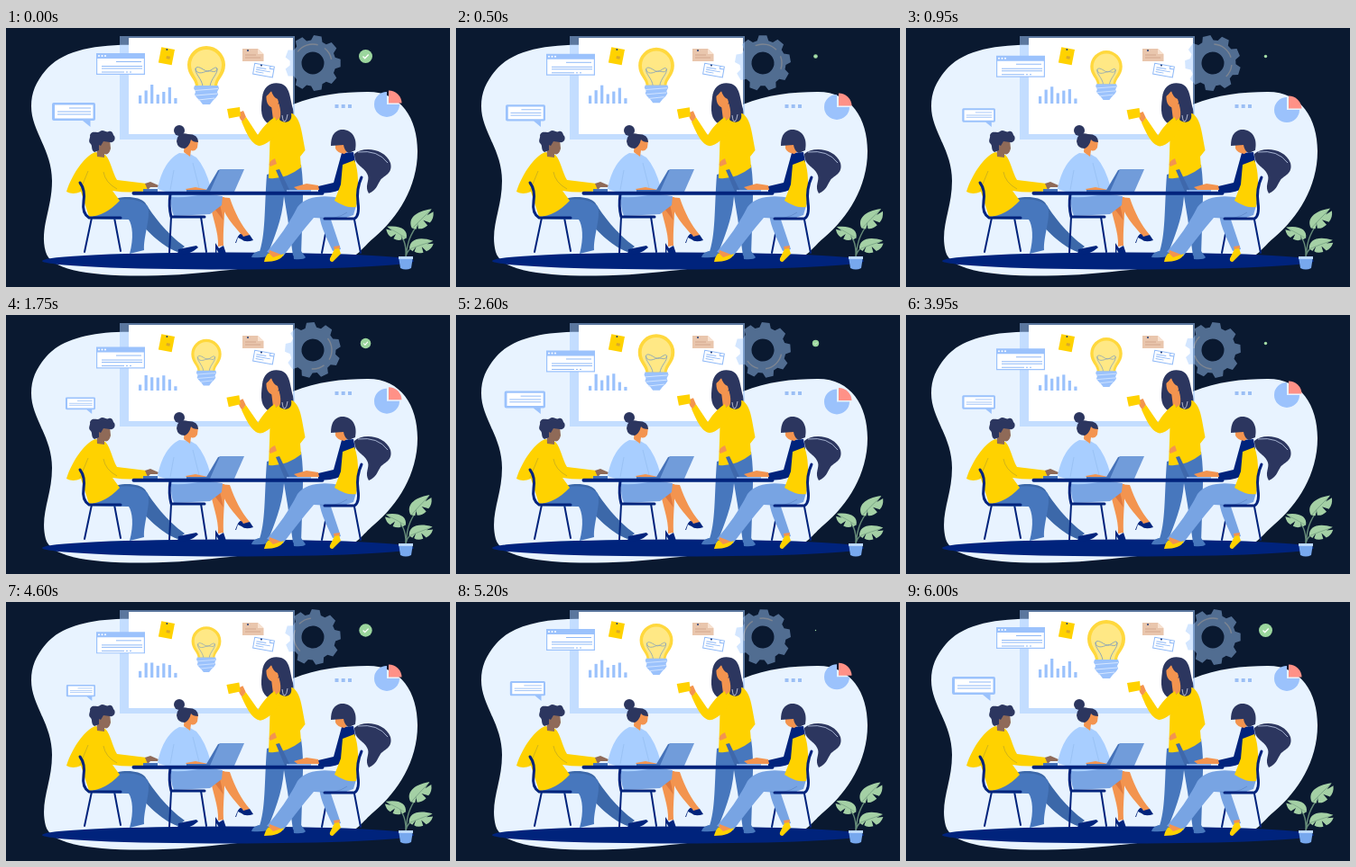
An HTML page that plays this animation: 492x288 px, repeating every 6.1 s.

```html
<!DOCTYPE html>
<html lang="en">
<head>
<meta charset="utf-8">
<title>Team meeting</title>
<style>
html, body { margin: 0; width: 100%; height: 100%; overflow: hidden; background: #0a1930 }
svg { display: block; width: 100vw; height: 100vh }
.navy { fill: #00237c }
.hair { fill: #2c365f }
.yellow { fill: #ffd200 }
.skin { fill: #f3944f }
.brown { fill: #8f6a58 }
.jeans { fill: #4777bd }
.shade { fill: #3c68a9 }
.sky { fill: #78a4e3 }
.pale { fill: #a8ceff }
.blue { fill: #9bc2fc }
.white { fill: #fff }
.line { fill: none; stroke: #00237c; stroke-width: 2; stroke-linecap: round; stroke-linejoin: round }
.bold { stroke-width: 3 }
.thin { fill: none; stroke: #8fb9f7; stroke-width: 1 }
.fold { fill: none; stroke: #1f3c78; stroke-width: .6; opacity: .35 }
</style>
</head>
<body>
<svg viewBox="0 0 492 288" preserveAspectRatio="none">
  <path fill="#e8f3ff" d="M150 19C100 17 62 25 44 47C33 60 28 72 28 87C28 115 51 135 51 170C51 202 37 222 44 249C49 268 88 276 155 275.500C225 275 270 263 345 262C390 261 388 250 408 233C434 211 456 177 456 137C456 101 438 71 401 71C372 71 345 74 318 85L250 50Z"/>
  <path fill="#a2cbff" opacity=".53" d="M126 9H320V124H126Z"/>
  <path class="white" d="M136 11H318V118H136Z"/>

  <!-- board -->
  <g id="bars" class="blue"></g>
  <g id="window">
    <path class="blue" d="M100 28H154V52H100Z"/>
    <path class="white" d="M101.200 34H152.800V50.800H101.200Z"/>
    <g class="white"><circle cx="103" cy="31" r="1"/><circle cx="106.500" cy="31" r="1"/><circle cx="110" cy="31" r="1"/></g>
    <path class="thin" d="M122 37.500H150M106 42.500H151M106 45H151M106 49H131M133 49H135M137 49H139"/>
  </g>
  <g transform="rotate(11 178 31)">
    <path class="yellow" d="M170.500 22.500H185.500V40H170.500Z"/>
    <path fill="#d9a92a" d="M178 31H182V34H178Z"/>
    <circle cx="177" cy="24" r="1" fill="#1f3c78"/>
  </g>
  <path fill="#e9c6ad" d="M262 23H279L285.500 29V37H262Z"/>
  <path fill="#f8e2d1" d="M279 23V29H285.500Z"/>
  <path d="M265 30H277M265 33H282" stroke="#cda086" stroke-width=".8"/>
  <circle cx="268" cy="25" r="1" fill="#1f3c78"/>
  <g transform="rotate(10 285 47)">
    <path class="thin" d="M274.500 41H296.500V53H274.500ZM277 45H288M277 47.500H293M277 50H286M292 41V44H296.500"/>
    <circle cx="282" cy="42" r="1" fill="#1f3c78"/>
  </g>
  <g id="bulb">
    <path fill="#ffd83d" d="M210 65C210 57 201 53 201 41A21 21 0 0 1 243 41C243 53 234 57 234 65Z"/>
    <path fill="#ffe885" d="M213 64C213 56 205 51 205 41A17 17 0 0 1 239 41C239 51 231 56 231 64Z"/>
    <path fill="none" stroke="#91a8b5" d="M218 65C217 56 209 51 210 45C212 41 218 46 222 48S232 41 234 45C235 51 227 56 226 65M210 45C211 52 218 50 222 48S233 52 234 45"/>
    <path class="blue" d="M209 64H235L236 67L234 71L235 74L233 77L229 81L226 85H218L215 81L211 77L209 74L210 71L208 67Z"/>
    <path d="M209 69.500L235 67.500M210 75L234 73M213 80L231 78" stroke="#d5e6ff"/>
  </g>

  <!-- floating icons -->
  <g id="gear" opacity=".47" fill="#a2cbff" fill-rule="evenodd"></g>
  <g id="check">
    <circle r="7.500" fill="#9bd69d"/>
    <path d="M-3 0L-.8 2.200L3.200-2" fill="none" stroke="#fff" stroke-width="1.300"/>
  </g>
  <g id="pie">
    <path class="blue" d="M422-14A14 14 0 1 0 436 0H422Z"/>
    <path fill="#ff9187" d="M424-15.500A14.500 14.500 0 0 1 438.500-1.500H424Z"/>
  </g>
  <path fill="#9bbff5" d="M364.500 85h4v4h-4zm7.200 0h4v4h-4zm7.300 0h4v4h-4z"/>
  <g id="bubble">
    <path class="blue" d="M53 83H97Q99 83 99 85V101Q99 103 97 103H93.500V110L85 103H53Q51 103 51 101V85Q51 83 53 83Z"/>
    <path class="white" d="M54 85.500H96.500V100.500H54Z"/>
    <path class="thin" d="M70 89H94M57 93H94M57 96H94"/>
  </g>

  <ellipse class="navy" cx="246" cy="259" rx="206" ry="9.500"/>

  <!-- plant -->
  <g id="plant">
    <path d="M443 254C445 242 445 233 458 216M443 254C444 238 439 232 434 227M443 254C445 246 450 243 460 241" fill="none" stroke="#668b78" stroke-width="1.400"/>
    <g id="leaves"></g>
  </g>
  <path fill="#77a8ee" d="M435 254H451L449 267Q443 270 437 267Z"/>
  <path fill="#bcd8ff" d="M435 254H451V257H435Z"/>

  <!-- standing presenter -->
  <path class="jeans" d="M289 163L327 152C331 180 328 200 328 222L327 253H318L312 211L308 187C306 214 297 233 290 252H280C288 230 286 203 289 163Z"/>
  <path class="jeans" d="M280 248L290 250V253Q287 256 272 255Q273 250 280 248ZM318 248H327L332 255Q330 258 319 257Z"/>
  <path class="hair" d="M284 77C285 64 295 59 305 62C315 66 314 76 318 90C320 101 316 106 305 108L292 107C282 102 282 92 284 77Z"/>
  <path class="skin" d="M294 86L303 84L306 97Q302 104 296 102Z"/>
  <path class="yellow" d="M293 103Q299 105 306 97L317 95C323 98 326 106 328 117L331.500 136L326 143L327 155Q309 169 291 167L292 140Z"/>
  <path class="skin" d="M288.500 74C290 69 301 69 303 75C304 82 300 89 295 88.500C290 87 288 82 288.500 74Z"/>
  <path class="hair" d="M287 77C287 65 300 60 308 66C314 72 312 82 316 95C318 105 309 107 303 102C306 94 303 86 301 79Q296 77 294 70Q291 74 287 77Z"/>
  <path d="M306 97Q307 105 309 104T312 96" fill="none" stroke="#edf2ff" stroke-width=".7"/>
  <g id="arm">
    <path class="yellow" d="M298 99C290 104 284 111 279 119L266 99L261 104C266 116 272 130 281 131C289 130 297 122 303 114Z"/>
    <path class="skin" d="M258 94L263 92L266 99L262 104Q258 101 258 94Z"/>
    <path class="yellow" d="M245 90L259 88L260 98L247 100.500Z"/>
  </g>
  <path class="skin" d="M298 145L300 151L293 154Q289 149 298 145Z"/>

  <!-- man on the left -->
  <path class="line" d="M95 211L87 249M120 211L127 248"/>
  <path class="shade" d="M112 194C126 185 148 187 154 194C162 207 178 229 198 243L190 249C171 242 154 223 144 211L119 212Z"/>
  <path class="jeans" d="M108 200C121 187 145 188 157 198C161 210 152 232 153 247L137 251C142 233 140 219 136 213L93 212Z"/>
  <path class="navy" d="M191 246L211 242L213 244Q203 253 190 252Z"/>
  <path class="yellow" d="M99 138C87 142 73 163 67 182Q74 186 83 182L92 210Q110 209 126 192L118 181Q138 184 157 181L156 173L123 169C118 161 116 147 110 141Z"/>
  <path class="fold" d="M91 159L82 181M108 160Q110 172 123 179"/>
  <path class="brown" d="M100 126Q106 119 115 124L116 134Q114 142 109 140L109 144L101 143Z"/>
  <path class="hair" d="M98 138C94 136 96 131 94 129C90 126 94 122 93 119C96 113 101 118 104 115C108 112 111 117 114 115C119 114 118 119 120 120C122 124 119 128 115 127L108 126L105 131L103 130L103 136Z"/>
  <path class="brown" d="M154 173L160 171L169 175L168 177L160 177L157 180Z"/>
  <path class="line bold" d="M82 172Q88 180 86 193T92 211H127"/>

  <!-- woman with the laptop -->
  <path class="line" d="M183 210L181 250M216 210L222 249"/>
  <path class="skin" d="M225 188H242C243 208 240 224 241 242L235 243C236 226 228 211 225 188Z"/>
  <path class="skin" d="M236 188L248 189C254 206 260 218 270 230L264 233C253 221 240 207 236 188Z"/>
  <path fill="#de793e" d="M236 192L241 214L228 197Z"/>
  <path class="navy" d="M232 239L236 245L241 242L245 254Q240 257 236 251L233.500 246L233 256H232ZM256 234Q260 225 263 232L270 230L274 236Q265 239 261 235L257 233L255 239H254Z"/>
  <path class="sky" d="M183 187Q208 181 240 187L239 197L226 207L186 209Q182 200 183 187Z"/>
  <path class="pale" d="M192 139C178 146 171 163 168 179L183 184V188Q204 189 221 184L227 178Q221 155 211 144L204 140Z"/>
  <path class="fold" d="M186 158L182 180M207 150L214 178" style="stroke:#638fc8"/>
  <path class="skin" d="M198 124Q204 118 213 125L212 133Q209 138 205 136L204 143L197 138Z"/>
  <circle class="hair" cx="192" cy="114" r="6"/>
  <path class="hair" d="M189 126Q190 115 202 118Q213 118 213 127Q207 127 205 124Q203 132 198 134Q190 134 189 126Z"/>
  <path class="skin" d="M199 179L210 177L224 180V183H202Z"/>
  <path class="line bold" d="M182 185Q180 198 183 210H220"/>

  <!-- woman on the right -->
  <path class="line" d="M357 213L350 250M386 213L393 250"/>
  <path class="sky" d="M389 194L385 208Q363 216 358 207L371 246L362 248C353 229 347 216 347 204Q355 190 372 187Z"/>
  <path class="sky" d="M388 195C364 184 334 184 323 199C314 217 302 234 289 249L307 254C318 239 330 224 341 211L376 213Z"/>
  <path class="fold" d="M348 211Q365 214 378 205"/>
  <path class="skin" d="M292 247L305 252L301 257L291 254ZM363 243L370 242L369 250L365 251Z"/>
  <path class="yellow" d="M291 250L296 255L308 251Q305 260 286 260Q287 254 291 250ZM364 246L369 245L371 251L362 260Q358 260 359 256Z"/>
  <path class="hair" d="M386 140C396 131 420 134 426 150C429 162 419 164 415 169C411 175 411 180 402 184C397 176 403 170 401 164C398 154 386 154 386 140Z"/>
  <path d="M390 138Q412 135 423 150" fill="none" stroke="#d7e5ff" stroke-width=".7"/>
  <path class="navy" d="M372 139L385 138L387 149L375 177Q364 185 346 183V176L363 172Z"/>
  <path class="yellow" d="M373 152L386 147Q393 164 388 199Q378 201 364 192L371 174Z"/>
  <path class="skin" d="M365 126H380V136L375 140Q367 139 365 134Z"/>
  <path class="hair" d="M360 131Q360 115 371 113C383 112 390 122 387 136L380 139Q375 137 374 130Z"/>
  <path class="skin" d="M346 175L333 173L319 177L323 180L347 180Z"/>
  <path class="line bold" d="M394 166Q388 179 390 194T386 212H353"/>

  <!-- table and laptops -->
  <path fill="#3e68ac" d="M299 158L303 157L315 182H309Z"/>
  <path fill="#91b8ef" d="M311 180H338V182.500H311Z"/>
  <path fill="#4572b9" d="M235 158L239 157L230 182H221Z"/>
  <path fill="#719cda" d="M237 157H264L253 182H226Z"/>
  <path fill="#4572b9" d="M200 180H225V182.500H200ZM152 179H168V182H152Z"/>
  <path class="line" style="stroke-width:4" d="M141.500 183.800H350.500"/>
</svg>
<script>
const el = id => document.getElementById(id);
const move = (id, value) => el(id).setAttribute('transform', value);
const scaleAt = (x, y, s) => `translate(${x} ${y}) scale(${s}) translate(${-x} ${-y})`;
const polar = (r, a) => `${r * Math.cos(a)} ${r * Math.sin(a)}`;

// Nine trapezoid teeth around a ring, with a hole and two highlight arcs
const teeth = 9;
const rim = [];
for (let i = 0; i < teeth; i++) {
  for (const [r, d] of [[25.5, -.25], [31, -.14], [31, .14], [25.5, .25]])
    rim.push(polar(r, i * 2 * Math.PI / teeth + d));
}
el('gear').innerHTML = `<path d="M${rim.join('L')}ZM12.500 0A12.500 12.500 0 1 0-12.500 0A12.500 12.500 0 1 0 12.500 0Z"/>
  <path d="M${polar(21, -2.5)}A21 21 0 0 1 ${polar(21, -1.3)}M${polar(21, -.9)}A21 21 0 0 1 ${polar(21, -.2)}" fill="none" stroke="#fff" stroke-width="1.4"/>`;

// Broad notched leaves: x, y, angle, size, side
const leaf = 'M-12 6C-14-4-5-10 12-8L6-3L13-5Q12 2 7 5L1 1L4 7Q-2 10-6 8L-5 2L-8 8Z';
el('leaves').innerHTML = [[461, 213, -14, 1.1, 1], [433, 228, 0, .9, -1], [460, 242, 12, 1, 1]]
  .map(([x, y, a, s, side]) => `<g transform="translate(${x} ${y}) rotate(${a}) scale(${s * side} ${s})">
    <path d="${leaf}" fill="#a4d0a5"/><path d="M-11 6Q-2 0 11-7" fill="none" stroke="#6b967b" stroke-width=".6"/></g>`).join('');

// Bars: middle height and swing
const bars = [[7, 2], [16.5, -2], [16, 5], [13.5, -3.5], [16, -3], [13.5, 4.5], [5, 1]];
el('bars').innerHTML = bars.map((_, i) => `<rect x="${147 + i * 6.55}" width="3.2"/>`).join('');

function draw(t) {
  const wave = (period, shift = 0) => Math.cos(2 * Math.PI * (t + shift) / period);
  const slow = wave(6000), mid = wave(3000);
  bars.forEach(([base, swing], i) => {
    const h = base + swing * slow, bar = el('bars').children[i];
    bar.setAttribute('y', 84 - h);
    bar.setAttribute('height', h);
  });
  move('window', `translate(0 ${6 - 6 * slow})`);
  move('bubble', scaleAt(99, 110, (40 + 8 * mid) / 48));
  move('bulb', scaleAt(222, 53, .89 + .11 * mid));
  move('gear', `translate(340 39) rotate(${t * .06})`);
  move('check', `translate(398.500 31.500) scale(${.54 + .46 * wave(1500)})`);
  move('pie', `translate(0 ${90 - 6.8 * wave(6000, 700)})`);
  move('arm', `rotate(${mid - 1} 300 108)`);
  move('plant', `rotate(${1.3 * mid - 1.3} 443 254)`);
}

function tick() {
  const t = performance.now() % 6100;
  draw(Math.min(6000, Math.floor(t / 50) * 50));
  requestAnimationFrame(tick);
}
tick();
</script>
</body>
</html>
```
